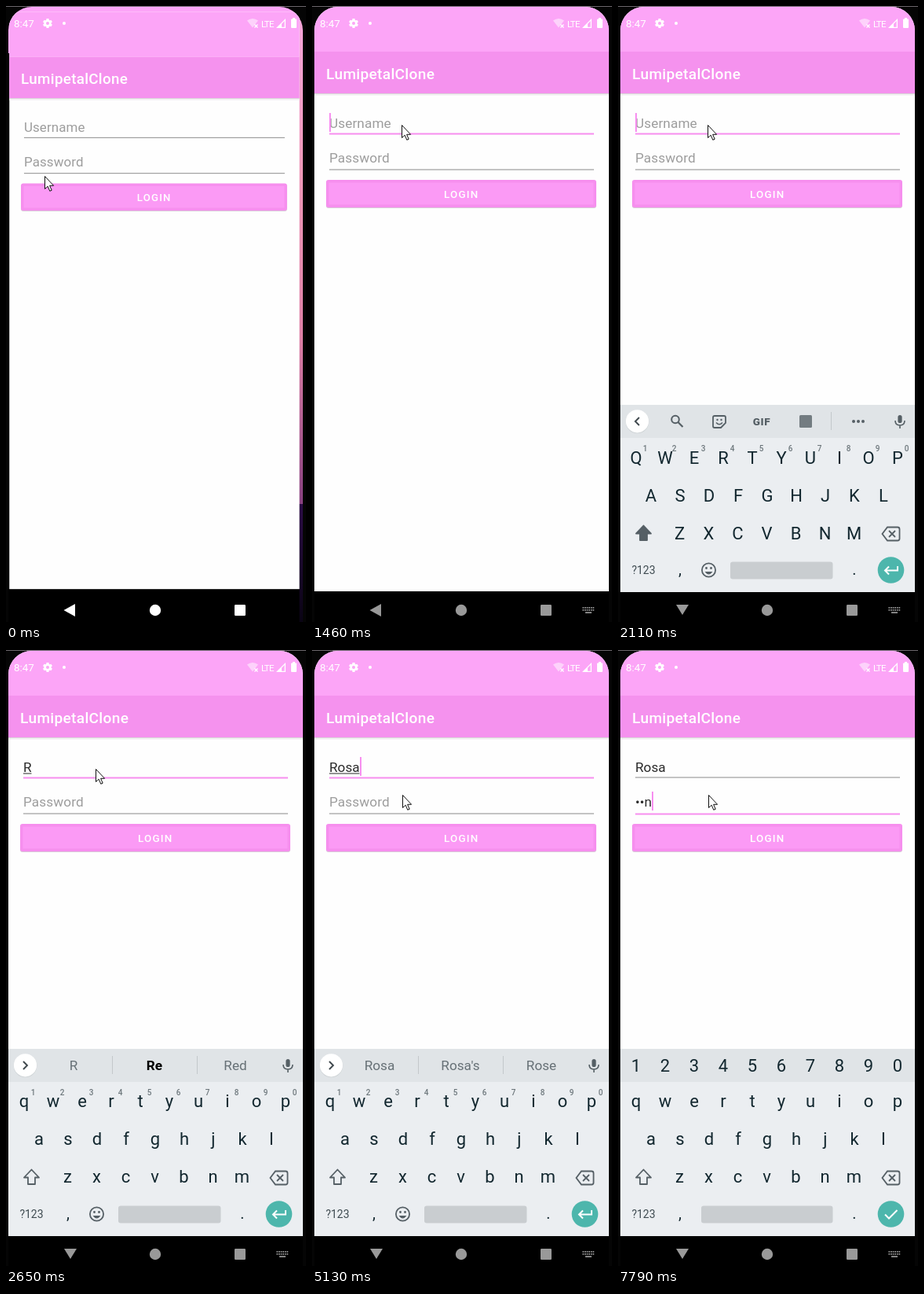
Recreate the animation shown at these times as an HTML page. Size 382 by 783 pixels, loop 8000 ms.

```html
<!DOCTYPE html>
<html lang="en">
<head>
<meta charset="utf-8">
<title>Login screen</title>
<style>
html, body { margin: 0; width: 100%; height: 100%; overflow: hidden; background: #000; }
svg { display: block; width: 382px; height: 783px; font-family: Roboto, sans-serif; white-space: pre; }
</style>
</head>
<body>
<svg id="stage" viewBox="0 0 382 783"></svg>
<script>
const LOOP = 8000;
const PINK = '#f592ee', INK = '#12272f', ICON = '#555f65';

// Each track is a list of [start time, value]; a value holds until the next one.
const tracks = {
  pointer: [[0, [49, 216]], [300, [70, 224]], [420, [100, 205]], [540, [122, 178]], [680, [117, 163]],
    [800, [114, 151]], [4860, [115, 173]], [5010, [115, 184]]],
  nav: [[0, '#fff'], [680, '#ddd'], [800, '#bbb'], [940, '#999']],
  focus: [[0, ''], [940, 'user'], [5260, 'pass']],
  user: [[0, ''], [2230, 'R'], [3090, 'Ro'], [3690, 'Ros'], [4210, 'Rosa']],
  pass: [[0, ''], [6410, 'R'], [6840, '•u'], [7790, '••n']],
  // Caret as [x, row], or null while it blinks off
  caret: [[0, null], [1340, [22, 0]], [1740, null], [2110, [22, 0]], [2230, [33, 0]], [2650, null],
    [3090, [43, 0]], [3550, null], [3690, [51, 0]], [4610, null], [5010, [61, 0]],
    [5540, [22, 1]], [5990, null], [6410, [32.5, 1]], [6840, [37, 1]], [7370, null], [7790, [43, 1]]],
  words: [[0, null], [2230, ['R', 'Re', 'Red']], [3090, ['Ro', 'Roll', 'Rosy']],
    [3810, ['Ros', 'Rose', 'Rosin']], [4210, ['Rosa', "Rosa's", 'Rose']]],
  caps: [[0, false], [2110, true], [2230, false], [6270, true], [6410, false]]
};
const valueAt = (track, t) => track.filter(([start]) => start <= t).pop()[1];

const rect = (x, y, w, h, fill, extra = '') =>
  `<rect x="${x}" y="${y}" width="${w}" height="${h}" fill="${fill}" ${extra}/>`;
const circle = (x, y, r, fill, extra = '') => `<circle cx="${x}" cy="${y}" r="${r}" fill="${fill}" ${extra}/>`;
const path = (d, fill, extra = '') => `<path d="${d}" fill="${fill}" ${extra}/>`;
const line = (d, color, width) => path(d, 'none', `stroke="${color}" stroke-width="${width}"`);
const text = (s, x, y, size, fill, extra = '') =>
  `<text x="${x}" y="${y}" font-size="${size}" fill="${fill}" ${extra}>${s}</text>`;
const mid = (s, x, y, size, fill, extra = '') => text(s, x, y, size, fill, `text-anchor="middle" ${extra}`);

function statusBar() {
  const teeth = [0, 60, 120].map(a => rect(51.4, 16, 3.2, 12, '#fff', `rx="0.6" transform="rotate(${a} 53 22)"`));
  return text('8:47', 10, 27, 13.4, '#fff') +
    teeth.join('') + circle(53, 22, 4.6, '#fff') + circle(53, 22, 2, '#fca5f7') +
    circle(74, 22, 2, '#fff') +
    path('M307 18.5Q314 13.5 321 18.5L314 27.5Z', '#fff', 'opacity=".5"') +
    line('M316.5 23.5L320.5 27.5M320.5 23.5L316.5 27.5', '#fff', 1.2) +
    text('LTE', 325, 26.5, 11.5, '#fff', 'letter-spacing="-0.8"') +
    path('M344 28L356 16V28Z', '#fff') + path('M351 22.8L354.7 19V26.7H351Z', '#fca5f7') +
    rect(363, 16.5, 7, 11.5, '#fff', 'rx="1"') + rect(365, 15, 3, 2, '#fff');
}

function field(value, hint, base, lineY, focused) {
  return text(value || hint, 22, base, 17.2, value ? '#2b2b2b' : '#9d9d9d', value ? '' : 'letter-spacing="0.1"') +
    (focused ? rect(22, lineY - 1, 337, 2, '#f78ff0') : rect(22, lineY - 1, 337, 1, '#8c8c8c'));
}

function app(s, t) {
  let out = rect(3, 0, 375, 744, '#fefefe') +
    rect(3, 111, 375, 1.3, '#d9d3d8') + rect(3, 112.3, 375, 1.5, '#f3f1f3') +
    rect(3, 0, 375, 58, '#fca5f7') + rect(3, 58, 375, 53, PINK) +
    text('LumipetalClone', 18, 92.5, 19.1, '#fff', 'font-weight="500" letter-spacing="0.3"') +
    field(s.user, 'Username', 155, 162.5, s.focus === 'user') +
    field(s.pass, 'Password', 199, 208.5, s.focus === 'pass') +
    rect(18, 222, 344, 35, '#d9c9d8', 'rx="3"') + rect(18, 221, 344, 35, '#f68fee', 'rx="3"') +
    rect(21.5, 224.5, 337, 28, '#fb9af5') +
    text('LOGIN', 168, 244, 13.4, '#fff', 'font-weight="500" letter-spacing="1.2"');
  if (s.user && t < 5540) out += rect(22, 156.5, 10.5 + [0, 10, 18.5, 28][s.user.length - 1], 1, '#2b2b2b');
  if (s.caret) out += rect(s.caret[0], 136 + 44 * s.caret[1], 2, 24, '#f78ff0');
  return out;
}

const mic = rect(356.4, 520, 5.2, 10, ICON, 'rx="2.6"') + line('M353 527Q353 533 359 533T365 527M359 533V537', ICON, 1.6);
const divider = x => rect(x, 516, 1, 23, '#c3c8cb');
const arrowBadge = d => circle(24.5, 528.5, 14.8, '#cfd4d7') + circle(24.5, 527.8, 14.6, '#fff') + line(d, '#3f484d', 1.9);

function toolBar() {
  const dots = [300, 306, 312].map(x => circle(x, 528, 2, ICON)).join('');
  return arrowBadge('M27 523L22 528L27 533') +
    circle(73, 525.5, 4.8, 'none', `stroke="${ICON}" stroke-width="2"`) + line('M76.5 529L82.5 535', ICON, 2.2) +
    path('M123 521H135Q137 521 137 523V530L131 536H123Q121 536 121 534V523Q121 521 123 521Z', 'none',
      `stroke="${ICON}" stroke-width="1.8"`) +
    circle(126.5, 526, 1.2, ICON) + circle(131.5, 526, 1.2, ICON) + line('M125 529.5Q129 534 133 529.5', ICON, 1.5) +
    mid('GIF', 183, 532.5, 13.5, ICON, 'font-weight="900" letter-spacing="0.6"') +
    rect(231, 520, 16, 16, '#737c81', 'rx="1.5"') + divider(271) + dots + mic;
}

function wordBar(words) {
  return arrowBadge('M22 523L27 528L22 533') + divider(135) + divider(243) + mic +
    words.map((w, i) => w === 'Re'
      ? mid(w, 189, 534, 17.2, '#000', 'font-weight="700"')
      : mid(w, 86 + 103 * i, 534, 17.2, '#667076')).join('');
}

function keyRow(keys, x, y, caps) {
  return [...keys].map((k, i) =>
    mid(caps ? k.toUpperCase() : k, x + 37 * i, caps ? y + 1.5 : y, 22, INK)).join('');
}

function keyboard(s, t) {
  const secret = t >= 5540;
  const digits = '1234567890';
  let out = rect(3, 507, 375, 42, '#e0e4e7') + rect(3, 549, 375, 196, '#ebeef1');
  if (secret) out += keyRow(digits, 23, 536, false);
  else out += (s.words ? wordBar(s.words) : toolBar()) +
    [...digits].map((d, i) => mid(d, 34.5 + 37 * i, 565.5, 10, '#6d777c', 'font-weight="500"')).join('');
  out += keyRow('qwertyuiop', 23, 580.5, s.caps) + keyRow('asdfghjkl', 42, 628.5, s.caps) +
    keyRow('zxcvbnm', 78.5, 676.5, s.caps) +
    path('M32.5 660.5L42 670.5H37V679H28V670.5H23Z', s.caps ? ICON : 'none',
      `stroke="${ICON}" stroke-width="1.8" stroke-linejoin="round"`) +
    path('M343 662.5H356Q358.5 662.5 358.5 665V677Q358.5 679.5 356 679.5H343L336.5 671Z', 'none',
      `stroke="${ICON}" stroke-width="1.8"`) +
    line('M345 667L353 675M353 667L345 675', ICON, 1.8) +
    mid('?123', 32.5, 722, 14, '#3f4b51') + mid(',', 79, 723, 20, INK) + mid('.', 301, 723, 20, INK);
  out += secret ? rect(106, 706.5, 167.5, 22, '#c9cdd0', 'rx="3"') :
    rect(143, 706.5, 130.5, 22, '#c9cdd0', 'rx="3"') +
    circle(115.5, 717, 8.6, 'none', `stroke="${ICON}" stroke-width="1.8"`) +
    circle(112.5, 714.5, 1.4, ICON) + circle(118.5, 714.5, 1.4, ICON) + path('M110.5 719H120.5Q115.5 726 110.5 719Z', ICON);
  out += circle(347.5, 717, 16.8, '#4db6ac') +
    line(secret ? 'M340 717.5L345 722.5L355.5 712' : 'M356 712V717.5H340M345 712.5L340 717.5L345 722.5', '#fff', 2);
  return `<g transform="translate(0 ${t < 1740 ? 1.6 : 0})">${out}</g>`;
}

function navBar(color, t) {
  let keys = '';
  if (t >= 1340) {
    for (let i = 0; i < 6; i++) keys += rect(344.5 + 2.6 * i, 764, 1.7, 1.7, color) + rect(344.5 + 2.6 * i, 767, 1.7, 1.7, color);
    keys += rect(348, 770.2, 8, 1.7, color);
  }
  return path(t >= 1600 ? 'M74 761H90L82 774Z' : 'M73.5 768L88 760V776Z', color) +
    circle(190, 768, 7.2, color) + rect(291, 761, 14, 14, color, 'rx="1.2"') + keys;
}

function scene(t) {
  const s = {};
  for (const name in tracks) s[name] = valueAt(tracks[name], t);
  const opening = t < 160;
  const [px, py] = s.pointer;
  let screen = rect(3, 0, 375, 783, '#000');
  if (opening) screen += rect(373, 0, 5, 633, 'url(#sky)') + rect(373, 633, 5, 150, 'url(#ground)') +
    rect(3, 741, 370.6, 42, '#000') + rect(3, 0, 370.6, 60, '#fca5f7');
  screen += `<g transform="${opening ? 'matrix(.985 0 0 .986 1.3 7.6)' : ''}">${app(s, t)}</g>` + statusBar();
  if (t >= 1600) screen += keyboard(s, t);
  const fade = (id, ...colors) => `<linearGradient id="${id}" x2="0" y2="1">` +
    colors.map((c, i) => `<stop offset="${i / (colors.length - 1)}" stop-color="${c}"/>`).join('') + '</linearGradient>';
  return `<defs>${fade('sky', '#f5a5dc', '#ee98b8', '#dd7fa5', '#87407f')}${fade('ground', '#2b0c45', '#0a0414')}
    <clipPath id="glass"><rect x="3" y="1" width="375" height="830" rx="30"/></clipPath></defs>` +
    rect(0, 0, 382, 783, '#050505') + rect(0, 0, 382, 1, '#6b666b') +
    `<g clip-path="url(#glass)">${screen}</g>` + navBar(s.nav, t) +
    path('M.5 .5V16.5L4.2 13.2L6.8 19.3L9.2 18.2L6.6 12.3H11.6Z', '#fff', `stroke="#111" transform="translate(${px} ${py})"`);
}

const stage = document.getElementById('stage');
let shown = '';
function tick() {
  const next = scene(performance.now() % LOOP);
  if (next !== shown) stage.innerHTML = shown = next;
  requestAnimationFrame(tick);
}
tick();
</script>
</body>
</html>
```
